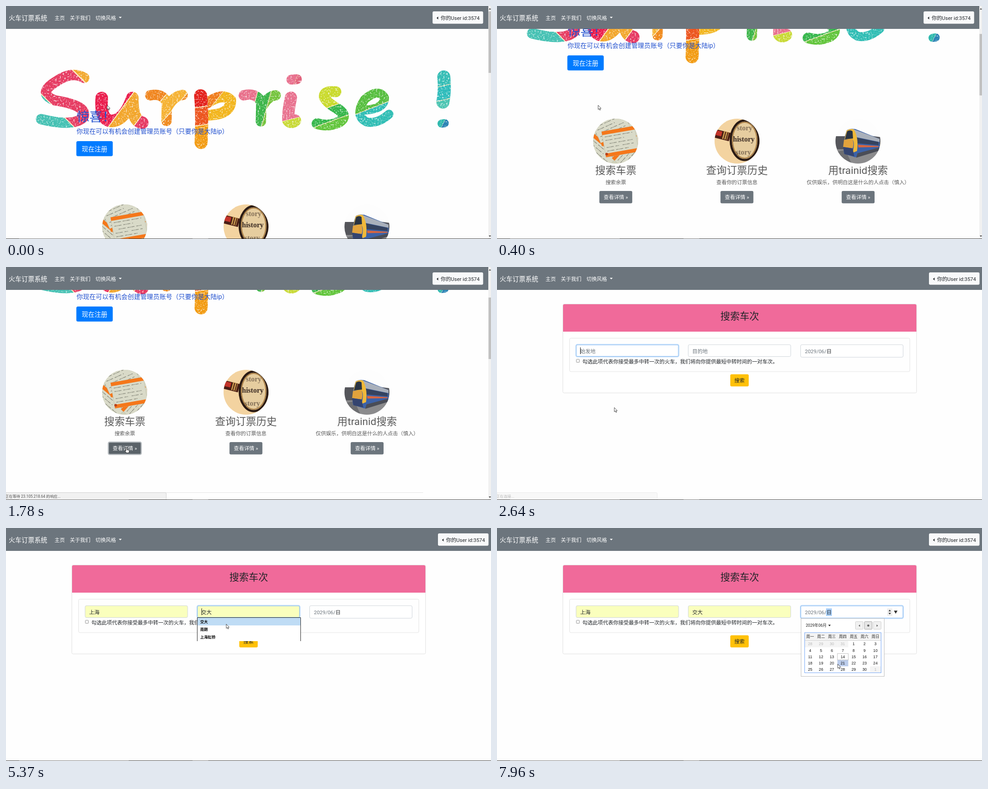
An HTML page for the animation above (8 s loop, 1079x519 px).

```html
<!DOCTYPE html>
<html lang="zh">
<head>
<meta charset="utf-8">
<style>
html, body { margin: 0; width: 100%; height: 100%; overflow: hidden; background: #fefefe; }
svg { display: block; }
text { font-family: Roboto, "Noto Sans CJK SC", "Noto Sans CJK", sans-serif; font-size: 11.45px; white-space: pre; }
.mid { text-anchor: middle; }
.white { fill: #fff; }
.ink { fill: #212529; }
.grey { fill: #6c757d; }
.thin { font-weight: 300; }
.small { font-size: 8.6px; }
.field { fill: #fff; stroke: #ced4da; }
.ring { fill: none; stroke: #80bdff; stroke-opacity: .5; stroke-width: 3; }
.option { font-size: 8.5px; font-weight: 700; }
.day { font: 8.6px "Liberation Sans", Arial, sans-serif; text-anchor: middle; }
.print { font: 16px "Liberation Serif", serif; font-weight: 700; text-anchor: middle; fill: #3a2a22; }
</style>
</head>
<body>
<svg width="1079" height="519" viewBox="0 0 1079 519">
  <defs>
    <filter id="grain" x="-5%" y="-15%" width="110%" height="130%" color-interpolation-filters="sRGB">
      <feTurbulence type="fractalNoise" baseFrequency=".3" numOctaves="2" seed="4"/>
      <feColorMatrix values="0 0 0 0 0  0 0 0 0 0  0 0 0 0 0  -3 0 0 0 2.6"/>
      <feComposite in="SourceGraphic" operator="in"/>
    </filter>
    <clipPath id="disc"><circle r="50"/></clipPath>
  </defs>
  <rect width="1079" height="519" fill="#fefefe"/>

  <g id="home">
    <g id="scroller">
      <g id="art" fill="none" stroke-linecap="round" stroke-linejoin="round" filter="url(#grain)"></g>
      <g fill="#2251cf">
        <text class="thin" x="157" y="257" style="font-size:28.6px">惊喜！</text>
        <text x="157" y="283.700" style="font-size:14.2px">你现在可以有机会创建管理员账号（只要你是大陆ip）</text>
      </g>
      <rect x="156.500" y="301" width="81" height="33.500" rx="3.500" fill="#007bff"/>
      <text class="mid white" x="197" y="323.500" style="font-size:14.3px">现在注册</text>

      <g transform="translate(264 492)" clip-path="url(#disc)">
        <rect x="-50" y="-50" width="100" height="100" fill="#cfd1bb"/>
        <g id="tickets"></g>
      </g>
      <g transform="translate(534 492)" clip-path="url(#disc)">
        <rect x="-50" y="-50" width="100" height="100" fill="#f3d3a0"/>
        <path d="M-52-18L-16-9" stroke="#4a1d15" stroke-width="19"/>
        <path d="M-52-20L-34-16" stroke="#c3342a" stroke-width="11"/>
        <path d="M-31-14L-20-11" stroke="#c79a4e" stroke-width="18" stroke-dasharray="3 2"/>
        <ellipse cx="17" cy="-2" rx="31" ry="44" fill="#e6cd9f" stroke="#2b1b14" stroke-width="5"/>
        <ellipse cx="17" cy="-2" rx="27" ry="40" fill="none" stroke="#a87a3e" stroke-width="2"/>
        <text class="print" x="15" y="1">history</text>
        <g opacity=".55">
          <text class="print" x="17" y="-24">story</text>
          <text class="print" x="14" y="30">story</text>
        </g>
      </g>
      <g transform="translate(803 492)" clip-path="url(#disc)">
        <rect x="-50" y="-50" width="100" height="100" fill="#fdfdfd"/>
        <path d="M-50-11H-28V25H-50ZM12-14L50-9V12H8Z" fill="#55565b"/>
        <path d="M-50 18H50V50H-50Z" fill="#8b8b8d"/>
        <path d="M-50 24L-28 20L-14 50H-50Z" fill="#6d6e71"/>
        <path d="M-25-24Q-18-29-6-27L48-5V19L-6 36L-31 28Q-35 2-25-24Z" fill="#3c62a8"/>
        <path d="M-14-28L48-5V2L-4-9Z" fill="#a9b0bb"/>
        <path d="M-3-8L46 2V9L-1 5Z" fill="#35435f"/>
        <path d="M0 8L46 11V13L1 14Z" fill="#d8653f"/>
        <path d="M-1 27L48 14V21L-4 37Z" fill="#4a4d57"/>
        <path d="M-25-24Q-16-29-9-26Q2-8-2 22L-12 26Q-6 4-12-4H-30Z" fill="#f0b93a"/>
        <path d="M-24-22Q-17-26-12-22L-11-6L-29-4Z" fill="#2a3442"/>
        <path d="M-31-3L-12-5Q-8 8-12 16L-33 13Z" fill="#e2a33c"/>
        <path d="M-33 13L-12 16L-8 34L-30 29Z" fill="#34446f"/>
      </g>
      <g id="columns"></g>
      <path d="M139 715.500H928" stroke="#e2e2e2"/>
    </g>
    <rect x="1073" width="6" height="519" fill="#f1f1f1"/>
    <rect id="thumb" x="1073.500" y="12" width="5.500" height="137" fill="#c1c1c1"/>
    <path d="M1074 8L1076.500 4.500L1079 8ZM1074 511L1076.500 514.500L1079 511Z" fill="#555"/>
  </g>

  <g id="form">
    <rect x="146.500" y="82.500" width="787" height="198" rx="3" fill="#fff" stroke="#dfdfdf"/>
    <path d="M147 144V86Q147 83 150 83H930Q933 83 933 86V144Z" fill="#f06a9a"/>
    <text class="mid ink" x="540" y="117" style="font-size:21.5px">搜索车次</text>
    <rect x="161.500" y="158.500" width="757" height="74.500" rx="3" fill="#fefefe" stroke="#e3e3e3"/>
    <rect x="176.500" y="205.500" width="7" height="7" rx="1" fill="#f4f4f4" stroke="#999"/>
    <text class="ink" x="190" y="214.800">勾选此项代表你接受最多中转一次的火车，我们将向你提供最短中转时间的一对车次。</text>
    <rect x="519" y="239" width="41" height="27" rx="3" fill="#ffc107"/>
    <text class="mid ink" x="539.500" y="257">搜索</text>
    <g id="fields"></g>
    <rect id="dayMark" x="732" y="179" width="13" height="17" fill="#a9cff8"/>
    <text class="grey" x="685" y="191.500">2029/06/</text>
    <text class="ink" x="733" y="191.500">日</text>
    <g id="spinner">
      <rect x="868" y="179" width="11.500" height="17" fill="#efefef"/>
      <path d="M871 185.500L873.700 182L876.400 185.500ZM871 189L873.700 192.500L876.400 189ZM883 184H891L887 191Z" fill="#333"/>
    </g>
    <path id="caret" d="M0 179V194" stroke="#111"/>
    <g id="menus"></g>
    <g id="calendar">
      <rect x="676.500" y="201.500" width="185" height="129" fill="#fff" stroke="#bdbdbd"/>
      <text class="small" x="687" y="220.300" fill="#222">2029年06月</text>
      <path d="M737 215.500H742.500L739.700 219Z" fill="#222"/>
      <g fill="#f1f1f1" stroke="#cfcfcf">
        <rect x="797.500" y="208.500" width="17" height="17" rx="1"/>
        <rect x="817.500" y="208.500" width="17" height="17" rx="1" fill="#e6e6e6" stroke="#a5a5a5"/>
        <rect x="837.500" y="208.500" width="17" height="17" rx="1"/>
      </g>
      <path d="M807.500 215V220L804.500 217.500ZM844.500 215V220L847.500 217.500Z" fill="#555"/>
      <circle cx="826" cy="217.300" r="2.400" fill="#666"/>
      <rect x="684.500" y="233.500" width="170" height="17" fill="#f4f4f4"/>
      <path d="M685 250.500H854" stroke="#d0d0d0"/>
      <g id="days"></g>
      <rect x="684.500" y="233" width="170" height="89.500" fill="none" stroke="#73a5f5"/>
    </g>
  </g>

  <rect id="nav" width="1079" height="51" fill="#6c757d"/>
  <g class="white">
    <text x="6" y="32.300" style="font-size:14.3px">火车订票系统</text>
    <text x="108" y="30.500">主页</text>
    <text x="142" y="30.500">关于我们</text>
    <text x="199" y="30.500">切换风格</text>
    <path d="M251 24H257.500L254.200 27.500Z"/>
  </g>
  <g id="user">
    <rect x="949" y="12" width="112.500" height="27.500" rx="3" fill="#f8f9fa"/>
    <path class="ink" d="M961.500 23.500V30L958 26.700Z"/>
    <text class="ink" x="967" y="30.500">你的User id:3574</text>
  </g>
  <g id="status">
    <path d="M0 502.500H354Q356.500 502.500 356.500 505V519H0Z" fill="#f1f1f1" stroke="#d0d0d0"/>
    <text id="statusText" x="-2" y="514" fill="#555" style="font-size:8.4px"></text>
  </g>
  <path d="M0 518.500H1079" stroke="#3c3c3c"/>
  <path d="M29 518.500H273M415 518.500H450" stroke="#777"/>

  <g id="pointer" stroke="#222" stroke-width=".8" fill="#fff">
    <path id="arrow" d="M0 0V9.500L2.200 7.500L3.700 11L5.200 10.300L3.800 7.100H6.600Z"/>
    <path id="hand" d="M-1 1Q0-1 1 1V5L5 6Q6.500 6.500 6 9L5 12H0L-3 8Q-3 6-1 7.500Z"/>
    <path id="beam" d="M-2-6H2M0-6V6M-2 6H2"/>
  </g>
</svg>
<script>
const $ = id => document.getElementById(id);
const set = (node, attrs) => { for (const k in attrs) node.setAttribute(k, attrs[k]); };
const show = (node, on) => { node.style.display = on ? '' : 'none'; };
function add(parent, tag, attrs, text) {
  const node = document.createElementNS('http://www.w3.org/2000/svg', tag);
  set(node, attrs);
  if (text !== undefined) node.textContent = text;
  return parent.appendChild(node);
}

// Brush lettering: stroke, width, gradient line, "colour end" bands
const strokes = [
  ['M174 160Q146 144 112 168Q68 194 108 210Q184 222 172 248Q150 270 78 252', 23, [180, 140, 70, 250], '#f2a92f .15 #e63c62 .71 #45c1b3 1'],
  ['M213 205Q209 256 236 256Q264 254 281 205M281 205Q280 255 303 260', 28, [200, 190, 310, 270], '#ea1c4c .5 #f2a62c .83 #e63a62 1'],
  ['M321 199Q346 193 358 214L357 256M360 224Q374 200 393 198', 23, [310, 187, 403, 268], '#f0851e .33 #f5b233 .6 #f08a1d 1'],
  ['M448 216Q482 192 500 210Q500 242 450 243', 24, [445, 195, 515, 250], '#ef7c1c .3 #f2b51d 1'],
  ['M433 200Q437 240 434 304', 29, [420, 185, 440, 318], '#e3201b .3 #ec541d .6 #f29b12 1'],
  ['M529 199Q556 192 568 214L567 257M571 222Q584 200 600 199', 23, [518, 190, 610, 215], '#e86f8a .42 #3cb54a .72 #74c33c 1'],
  ['M634 204Q627 235 628 255Q634 262 643 255', 27, [625, 190, 645, 270], '#e8718e .75 #c8d935 1'],
  ['M635 164L647 163', 22, [620, 155, 660, 172], '#e8718e .6 #e0607a 1'],
  ['M734 191Q708 188 708 202Q712 214 736 228Q762 244 742 258Q718 270 692 262', 24, [700, 180, 735, 275], '#c9da2c .48 #35b64b .78 #62c53c 1'],
  ['M788 232Q842 232 842 204Q828 182 798 208Q774 244 802 258Q826 264 852 241', 20, [800, 180, 835, 270], '#56be3e .5 #2fbdb4 1'],
  ['M974 158Q977 188 972 214', 29, [965, 143, 985, 228], '#35bdb5 .4 #2fbcbb .75 #4cc5b2 1'],
  ['M969 262L976 261', 18, [960, 255, 985, 268], '#2fb9ae .5 #2a83b4 1']
];
strokes.forEach(([d, width, [x1, y1, x2, y2], bands], i) => {
  const grad = add(document.querySelector('defs'), 'linearGradient',
    { id: 'ink' + i, gradientUnits: 'userSpaceOnUse', x1, y1, x2, y2 });
  const stop = (offset, color) => add(grad, 'stop', { offset, 'stop-color': color });
  let from = 0;
  const parts = bands.split(' ');
  for (let k = 0; k < parts.length; k += 2) {
    const to = +parts[k + 1];
    stop(from, parts[k]);
    stop(to, parts[k]);
    if (to < 1) { stop(to, '#fbe3b8'); stop(to + .015, '#fbe3b8'); }
    from = to + .015;
  }
  add($('art'), 'path', { d, stroke: `url(#ink${i})`, 'stroke-width': width });
});

function ticket(x, y, angle) {
  const g = add($('tickets'), 'g', { transform: `translate(${x} ${y}) rotate(${angle})` });
  add(g, 'rect', { x: -37, y: -29, width: 74, height: 58, fill: '#d9dac8', stroke: '#aeb09c', 'stroke-width': .5 });
  add(g, 'path', { d: 'M-37-25H37M-37 25H37', stroke: '#f5771a', 'stroke-width': 8 });
  add(g, 'path', { d: 'M-32-16H30M-32-8H10M-24 0H28M-32 8H-4M4 8H30M-32 16H16', stroke: '#85877a', 'stroke-width': 1.3, 'stroke-dasharray': '5 1 2 1 7 4' });
}
[[-38, -26, -62], [30, -40, 24], [-40, 28, 40], [38, 30, -48], [-8, -30, -24], [10, 1, -10]].forEach(p => ticket(...p));
add($('tickets'), 'circle', { cx: -20, cy: 29, r: 3, fill: '#b9421c' });

const columns = [
  [264.3, '搜索车票', '搜索余票'],
  [533.8, '查询订票历史', '查看你的订票信息'],
  [803.4, '用trainid搜索', '仅供娱乐，供明白这是什么的人点击（慎入）']
];
const buttons = columns.map(([x, title, note]) => {
  const g = $('columns');
  add(g, 'text', { class: 'mid', x, y: 565, fill: '#5a5a5a', style: 'font-size:22.9px' }, title);
  add(g, 'text', { class: 'mid', x, y: 587.5, fill: '#5a5a5a' }, note);
  const box = add(g, 'rect', { x: x - 36.6, y: 603, width: 73.2, height: 27.4, rx: 3, fill: '#6c757d', 'stroke-width': 2.5 });
  add(g, 'text', { class: 'mid white', x, y: 621 }, '查看详情 »');
  return box;
});

const fields = [[176, 26.5, '始发地'], [425.5, 26.5, '目的地'], [675.5, 28, '']].map(([x, height, hint]) => {
  const g = $('fields'), size = { x, y: 173, width: 228, height, rx: 3 };
  const box = add(g, 'rect', { class: 'field', ...size });
  const ring = add(g, 'rect', { class: 'ring', ...size });
  return { x, hint, box, ring, text: add(g, 'text', { x: x + 9, y: 191.5 }) };
});

const menus = [
  { x: 175.5, bottom: 286, open: 3560, close: 4410, items: ['a', '上海', '北京南', '小榄', '广州南'], pick: '上海' },
  { x: 425.5, bottom: 252, open: 5040, close: 5820, items: ['交大', '南朗', '上海虹桥'], pick: '交大' }
];
for (const m of menus) {
  m.g = add($('menus'), 'g', {});
  add(m.g, 'path', { d: `M${m.x} ${m.bottom}V199.500h230V${m.bottom}`, fill: '#fff', stroke: '#222' });
  m.bar = add(m.g, 'rect', { x: m.x + .5, width: 229, height: 17, fill: '#bfdcf5' });
  m.items.forEach((s, i) => add(m.g, 'text', { class: 'option', x: m.x + 6.5, y: 212.3 + 17 * i }, s));
}

const cellX = c => 684.7 + 24.2 * c, cellY = r => 251.3 + 14.2 * r;
const cell = (c, r, attrs) => add($('days'), 'rect', { x: cellX(c), y: cellY(r), width: 24.2, height: 14.2, ...attrs });
[...'一二三四五六日'].forEach((s, c) =>
  add($('days'), 'text', { class: 'mid small', x: cellX(c) + 12, y: 245, fill: '#222' }, '周' + s));
const hover = cell(0, 0, { fill: '#e3ebf8' });
const picked = cell(3, 3, { fill: '#bccdec' });
cell(3, 2, { fill: 'none', stroke: '#bbb', 'stroke-width': .9 });
for (let i = 0; i < 35; i++) {
  const c = i % 7, r = Math.floor(i / 7), n = i - 3, out = n < 1 || n > 30;
  if (out) cell(c, r, { fill: '#f4f4f4' });
  add($('days'), 'text', { class: 'day', x: cellX(c) + 12, y: cellY(r) + 10, fill: out ? '#b8b8b8' : '#111' },
    n < 1 ? n + 31 : n > 30 ? n - 30 : n);
}

// Bursts of change: first, last, number of steps
const bursts = [[70, 770, 10], [940, 1020, 2], [1400, 1480, 2], [1780, 1780, 1], [2180, 2720, 8],
  [2870, 3260, 6], [3560, 3560, 1], [3730, 4030, 5], [4260, 5040, 11], [5120, 5370, 4],
  [5670, 5670, 1], [5820, 6120, 5], [6350, 6730, 6], [6960, 7650, 10], [7960, 7960, 1]];
function held(t) {
  let h = 0;
  for (const [a, b, n] of bursts) {
    if (t < a) break;
    const step = (b - a) / (n - 1) || 1;
    h = t >= b ? b : a + Math.floor((t - a) / step) * step;
  }
  return h;
}

const path = [[0, 225, 221], [460, 225, 221], [770, 268, 402], [2180, 268, 402], [2560, 261, 313],
  [2800, 261, 313], [3260, 289, 181], [3650, 289, 181], [4030, 245, 231], [4400, 245, 231],
  [4960, 500, 183], [5050, 500, 183], [5370, 490, 214], [5820, 490, 214], [6120, 885, 186],
  [6900, 885, 186], [7650, 758, 303], [8001, 758, 303]];
function pointerAt(t) {
  const i = path.findIndex(p => p[0] > t), a = path[i - 1], b = path[i];
  const u = (t - a[0]) / (b[0] - a[0]), s = u * u * (3 - 2 * u);
  return [a[1] + (b[1] - a[1]) * s, a[2] + (b[2] - a[2]) * s];
}
const ramp = (t, a, b) => Math.max(0, Math.min(1, (t - a) / (b - a)));
const scrollAt = t => 191 * ramp(t, 40, 380) + 22 * (1 - (1 - ramp(t, 382, 537)) ** 2);

const focus = [[2100, 4800], [4800, 6350], [6350, 9000]];
function render(time) {
  const t = held(time), home = t < 2180, [x, y] = pointerAt(t), scroll = scrollAt(t);
  show($('home'), home);
  show($('form'), !home);
  set($('scroller'), { transform: `translate(0 ${-scroll})` });
  set($('thumb'), { y: 12 + scroll * .263 });
  set($('nav'), { width: home ? 1073 : 1079 });
  set($('user'), { transform: `translate(${home ? 0 : 12} 0)` });
  set(buttons[0], {
    fill: t >= 940 ? '#5a6268' : t >= 690 ? '#636b72' : '#6c757d',
    stroke: t >= 1400 ? '#b5babe' : 'none'
  });

  show($('status'), t >= 690 && t < 2720);
  set($('status'), { opacity: t < 2500 ? 1 : .4 });
  $('statusText').textContent = t < 940 ? '' : t < 1780 ? '23.105.218.64/query'
    : home ? '正在等待 23.105.218.64 的响应...' : '正在连接...';

  menus.forEach((m, i) => {
    const open = t >= m.open && t < m.close, row = open ? Math.floor((y - 200) / 17) : -1, f = fields[i];
    const value = t >= m.close ? m.pick : row >= 0 ? m.items[row] : '';
    show(m.g, open);
    show(m.bar, row >= 0);
    set(m.bar, { y: 200 + 17 * row });
    f.text.textContent = value || f.hint;
    set(f.text, { class: value ? 'ink' : 'grey' });
    f.box.style.fill = value ? '#faffbd' : '#fff';
  });
  focus.forEach(([a, b], i) => set(fields[i].ring, { opacity: ramp(t, a - 80, a + 80) - ramp(t, b - 80, b + 80) }));

  const second = t >= 4800, typed = t >= menus[+second].close;
  show($('caret'), t < 6350 && !(t >= 2870 && t < 3260) && !(t >= 5670 && t < 5820));
  set($('caret'), { transform: `translate(${(second ? 435.5 : 185.5) + (typed ? 23 : 0)} 0)` });
  show($('spinner'), t >= 6040);
  show($('dayMark'), t >= 6350);
  show($('calendar'), t >= 6960);
  const c = Math.floor((x - 684.7) / 24.2), r = Math.floor((y - 251.3) / 14.2);
  show(hover, c >= 0 && c < 7 && r >= 0 && r < 5 && t < 7650);
  set(hover, { x: cellX(c), y: cellY(r) });
  show(picked, t >= 7960);

  const hand = home && t >= 690, beam = !home && y > 172 && y < 200 && x < 654;
  set($('pointer'), { transform: `translate(${x} ${y})` });
  show($('hand'), hand);
  show($('beam'), beam);
  show($('arrow'), !hand && !beam);
}

function tick() {
  render(performance.now() % 8000);
  requestAnimationFrame(tick);
}
tick();
</script>
</body>
</html>
```
